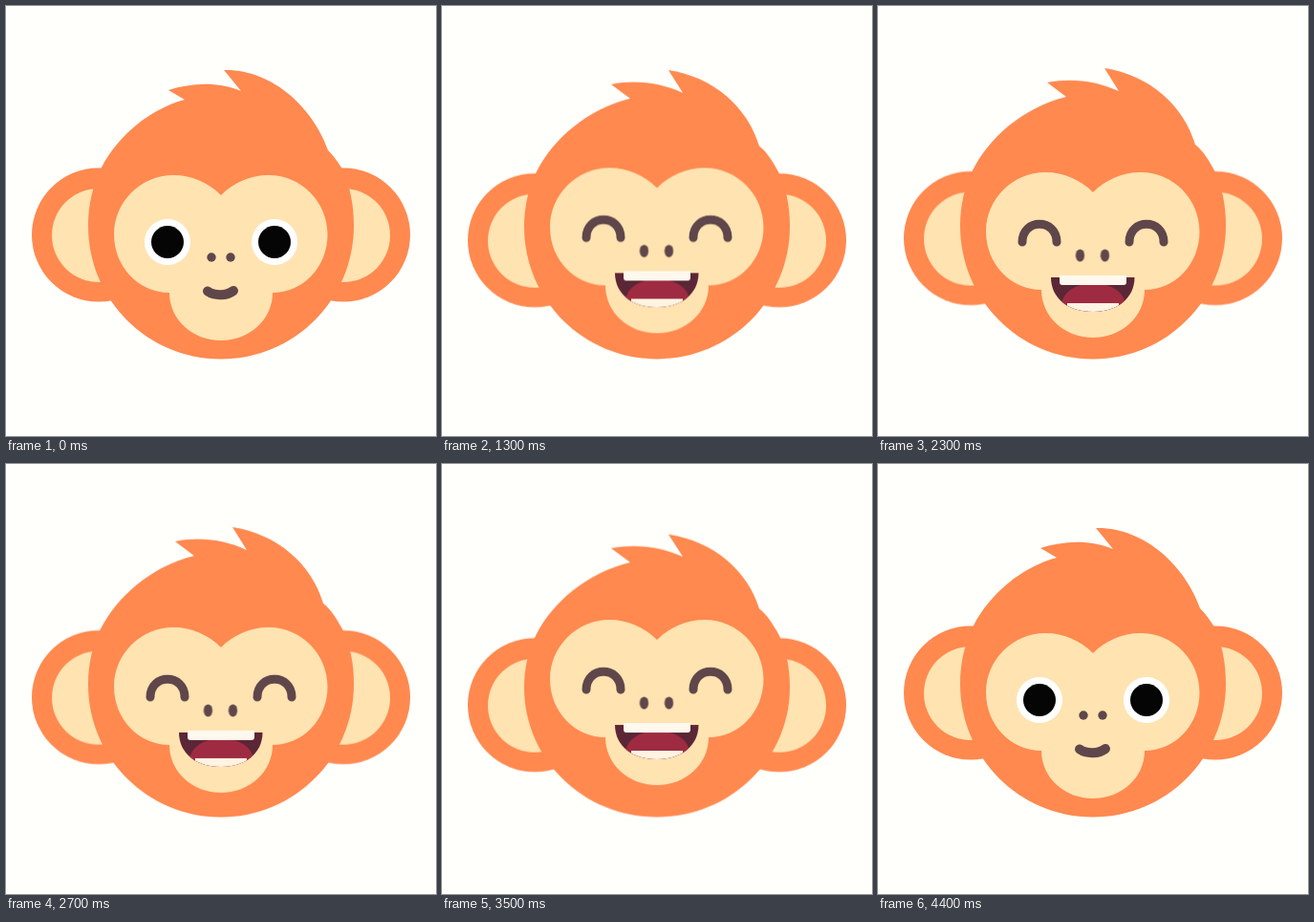
Write an HTML page without scripts that moves like this. It is 450 px wide and 450 px high and loops after 4500 ms.

```html
<!DOCTYPE html>
<html lang="en">
<head>
<meta charset="utf-8">
<title>Laughing monkey</title>
<style>
  html, body { margin: 0; width: 100%; height: 100%; overflow: hidden; background: #fffffc; }
  svg { display: block; width: 100%; height: 100%; }

  .fur { fill: #ff894f; }
  .skin { fill: #ffe3b1; }
  .line { fill: none; stroke: #5f464a; stroke-width: 9; stroke-linecap: round; }
  .nostril { fill: #5f464a; }

  .ears, .head, .face, .hair, .white, .pupil, .open-eye, .shut-eye,
  .nl, .nr, .smile, .closed, .laugh, .jaw {
    animation: 4500ms infinite cubic-bezier(.37, 0, .63, 1);
  }
  .ears { animation-name: ears; }
  .head { animation-name: head; transform-origin: 225px 369.5px; }
  .face { animation-name: face; animation-delay: 35ms; }
  .hair { animation-name: hair; }
  .white { animation-name: white; }
  .pupil { animation-name: pupil; }
  .open-eye, .closed { animation-name: calm; animation-timing-function: step-end; }
  .shut-eye, .laugh { animation-name: merry; animation-timing-function: step-end; }
  .nl { animation-name: nl; }
  .nr { animation-name: nr; }
  .smile { animation-name: smile; }
  .jaw { animation-name: jaw; transform-origin: 225px 287px; }

  /* Nodding: one slow lift, then a quick bounce every 460 ms */
  @keyframes ears {
    0%, 6.67%, 96.67%, 100% { transform: none; }
    25.33%, 35.56%, 45.78%, 56%, 66.22%, 76.44%, 86.67% { transform: translateY(14.5px); }
    30.44%, 40.67%, 50.89%, 61.11%, 71.33%, 81.56%, 91.78% { transform: translateY(3.5px); }
  }
  @keyframes head {
    0%, 6.67%, 96.67%, 100% { transform: none; }
    25.33%, 35.56%, 45.78%, 56%, 66.22%, 76.44%, 86.67% { transform: scaleY(.966); }
    30.44%, 40.67%, 50.89%, 61.11%, 71.33%, 81.56%, 91.78% { transform: none; }
  }
  @keyframes face {
    0%, 6.67%, 96.67%, 100% { transform: none; }
    25.33%, 35.56%, 45.78%, 56%, 66.22%, 76.44%, 86.67% { transform: translateY(-14.3px); }
    30.44%, 40.67%, 50.89%, 61.11%, 71.33%, 81.56%, 91.78% { transform: translateY(-2.7px); }
  }

  @keyframes hair {
    0%, 21%, 96.67%, 100% {
      d: path("M187,98 C150,108 117,136 100,169 C91,187 86,208 86,230 C86,307 148,369.5 225,369.5 C302,369.5 364,307 364,230 C364,208 360,187 351,169 C347,163 343,157 337,151 C322,108 280,66 228,67 L246,89 C222,79 195,80 170,88 Z");
    }
    29%, 91.78% {
      d: path("M197,95 C152,106 116,138 99,172 C91,188 86,208 86,230 C86,307 148,369.5 225,369.5 C302,369.5 364,307 364,230 C364,208 360,188 352,172 C347,163 341,152 332,145 C320,104 284,72 237,65 L252,89 C228,78 202,75 177,80 Z");
    }
  }

  @keyframes white {
    0%, 10%, 96.67%, 100% {
      d: path("M-24,0 C-24,-13.3 -13.3,-24 0,-24 C13.3,-24 24,-13.3 24,0 C24,13.3 13.3,24 0,24 C-13.3,24 -24,13.3 -24,0 Z");
    }
    20%, 94% {
      d: path("M-24,0 C-24,-13.3 -13.3,-24 0,-24 C13.3,-24 24,-13.3 24,0 C24,5 14,7.5 0,7.5 C-14,7.5 -24,5 -24,0 Z");
    }
  }
  @keyframes pupil {
    0%, 10%, 96.67%, 100% {
      d: path("M-17,0 C-17,-9.4 -9.4,-17 0,-17 C9.4,-17 17,-9.4 17,0 C17,9.4 9.4,17 0,17 C-9.4,17 -17,9.4 -17,0 Z");
    }
    20%, 94% {
      d: path("M-17,0 C-17,-9.4 -9.4,-17 0,-17 C9.4,-17 17,-9.4 17,0 C17,4.5 11,6.5 0,6.5 C-11,6.5 -17,4.5 -17,0 Z");
    }
  }
  @keyframes calm {
    0%, 94%, 100% { opacity: 1; }
    23.3% { opacity: 0; }
  }
  @keyframes merry {
    0%, 94%, 100% { opacity: 0; }
    23.3% { opacity: 1; }
  }

  @keyframes nl {
    0%, 9%, 96.67%, 100% { transform: translate(215px, 263px); }
    20% { transform: translate(213px, 263px) scaleY(1.28); }
    28%, 92% { transform: translate(211.5px, 264px) scaleY(1.38); }
  }
  @keyframes nr {
    0%, 9%, 96.67%, 100% { transform: translate(235px, 263px); }
    20% { transform: translate(236.5px, 263px) scaleY(1.28); }
    28%, 92% { transform: translate(237.5px, 264px) scaleY(1.38); }
  }

  @keyframes smile {
    0%, 9%, 96.67%, 100% { d: path("M211,298.5 C218,303.5 231,303.5 238,298"); stroke-width: 10px; }
    20%, 94% { d: path("M191,291.5 C205,306 246,306 260,291.5"); stroke-width: 9px; }
  }
  @keyframes jaw {
    0%, 23.3%, 94%, 100% { transform: scaleY(.35); }
    28%, 91.78% { transform: none; }
  }
</style>
</head>
<body>
<svg viewBox="0 0 450 450">
  <defs>
    <clipPath id="lips">
      <path d="M181,287 H268.5 C268.5,309 250,323 225,323 C199,323 181,309 181,287 Z"/>
    </clipPath>
  </defs>

  <g class="ears">
    <circle class="fur" cx="97" cy="239.5" r="70"/>
    <circle class="fur" cx="353" cy="239.5" r="70"/>
    <circle class="skin" cx="97" cy="240" r="49"/>
    <circle class="skin" cx="353" cy="240" r="49"/>
  </g>

  <g class="head">
    <path class="fur hair" d="M187,98 C150,108 117,136 100,169 C91,187 86,208 86,230 C86,307 148,369.5 225,369.5 C302,369.5 364,307 364,230 C364,208 360,187 351,169 C347,163 343,157 337,151 C322,108 280,66 228,67 L246,89 C222,79 195,80 170,88 Z"/>
  </g>

  <g class="face">
    <path class="skin" d="M225,198 C212,185 195,177 175,177 C141,177 113,205 113,239 C113,273 139,300 171,300 C171,328 195,350 225,350 C255,350 279,328 279,300 C311,300 336.500,273 336.500,239 C336.500,205 309,177 275,177 C255,177 238,185 225,198 Z"/>

    <g transform="translate(169 247)">
      <g class="open-eye">
        <path class="white" fill="#fff"/>
        <path class="pupil" fill="#050505"/>
      </g>
      <path class="line shut-eye" d="M-18,-2 V-2 M-18,-2 M-18,-2 M-18,-2 M-18,-2 M-18,-2 M-18,-2 M-18,3 C-18,-22 18,-22 18,3" style="d: path('M-18,3 C-18,-22 18,-22 18,3')"/>
    </g>
    <g transform="translate(281 247)">
      <g class="open-eye">
        <path class="white" fill="#fff"/>
        <path class="pupil" fill="#050505"/>
      </g>
      <path class="line shut-eye" d="M-18,3 C-18,-22 18,-22 18,3"/>
    </g>

    <circle class="nostril nl" r="4.7"/>
    <circle class="nostril nr" r="4.7"/>

    <g class="closed">
      <path class="line smile" d="M211,298.5 C218,303.5 231,303.5 238,298"/>
    </g>

    <g class="laugh">
      <g class="jaw">
        <g clip-path="url(#lips)">
          <rect x="180" y="286" width="90" height="40" fill="#5b2635"/>
          <ellipse cx="225.500" cy="315" rx="33" ry="22" fill="#9e2b41"/>
          <rect x="198" y="314" width="54" height="10" fill="#fff3e2"/>
        </g>
        <path d="M190,285 H260 V292 Q260,295 257,295 H193 Q190,295 190,292 Z" fill="#fff8ee"/>
      </g>
    </g>
  </g>
</svg>
</body>
</html>
```
